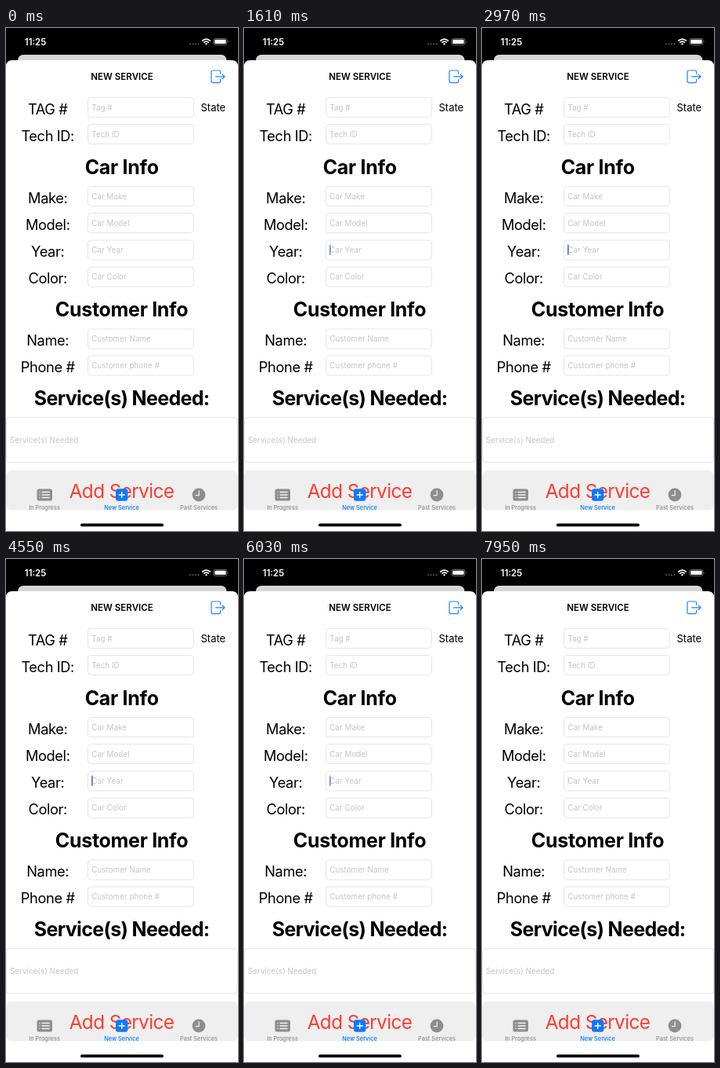
Recreate the animation shown at these times as an HTML page. Size 296 by 640 pixels, loop 8000 ms.

```html
<!DOCTYPE html>
<html lang="en">
<head>
<meta charset="utf-8">
<title>New service form</title>
<style>
  html, body { margin: 0; width: 100%; height: 100%; overflow: hidden; background: #000; }
  svg { display: block; width: 296px; height: 640px; font-family: Inter, Roboto, sans-serif; }
  .mid { text-anchor: middle; }
  .time { font-size: 11.4px; font-weight: 600; fill: #fff; }
  .title { font-size: 11.6px; font-weight: 600; }
  .head { font-size: 25px; font-weight: 700; letter-spacing: -.3px; }
  .head.tight { letter-spacing: -.66px; }
  .label { font-size: 18.3px; letter-spacing: -.4px; }
  .hint { font-size: 9.8px; letter-spacing: .04px; fill: #c4c4c6; }
  .state { font-size: 13px; }
  .add { font-size: 24.3px; letter-spacing: -.6px; fill: #ff3b30; }
  .tab { font-size: 7.35px; font-weight: 500; fill: #8e8e8e; }
  .tab.on { fill: #0a7aff; }
  .box { fill: #fff; stroke: #e5e5e5; stroke-width: 1; }
  .line { fill: none; stroke-linecap: round; stroke-linejoin: round; }

  .caret { fill: #335fd2; animation: blink 8s step-end infinite; }
  .shine { opacity: 0; animation: sweep 8s step-end infinite; }

  @keyframes blink {
    0%, 15.625%, 28.375%, 39.5%, 58.25%, 70.875%, 83.625%, 96.375% { opacity: 0; }
    6.25%, 18.625%, 44.75%, 61.25%, 73.875%, 86.625%, 99.375% { opacity: .08; }
    7.875%, 20.125%, 62.75%, 75.375%, 88.125% { opacity: .65; }
    14.125%, 26.875%, 69.5%, 82.125%, 94.875% { opacity: .55; }
    30.25%, 46.75% { opacity: 1; }
    37.125%, 56.875% { opacity: .85; }
  }
  @keyframes sweep {
    0%, 37.125% { opacity: 0; }
    30.25% { opacity: 1; transform: none; }
    31.5% { opacity: .8; transform: translateX(25px); }
    32.875% { opacity: .6; transform: translateX(50px); }
    34.125% { opacity: .3; transform: translateX(75px); }
  }
</style>
</head>
<body>
<svg viewBox="0 0 296 640">
  <defs>
    <linearGradient id="glow">
      <stop offset="0" stop-color="#7c7c7c"/>
      <stop offset=".35" stop-color="#6a6a6a"/>
      <stop offset=".7" stop-color="#3c3c3c"/>
      <stop offset="1" stop-color="#a0a0a0"/>
    </linearGradient>
    <clipPath id="pill"><rect x="95" y="630.5" width="106" height="3.8" rx="1.9"/></clipPath>
  </defs>
  <rect width="296" height="640"/>

  <!-- status bar -->
  <text class="time mid" x="37.5" y="21.6">11:25</text>
  <g fill="#5c5c5c">
    <circle cx="235" cy="20.3" r="1"/><circle cx="238.5" cy="20.3" r="1"/>
    <circle cx="242" cy="20.3" r="1"/><circle cx="245.5" cy="20.3" r="1"/>
  </g>
  <path d="M250.2 16.5Q255.5 11.7 260.8 16.5M252.2 18.6Q255.5 15.6 258.8 18.6" fill="none" stroke="#fff" stroke-width="1.7"/>
  <path d="M253.8 19.9Q255.5 18.6 257.2 19.9L255.5 21.7Z" fill="#fff"/>
  <rect x="264.9" y="13.4" width="17" height="8" rx="2.4" fill="none" stroke="#8a8a8a" stroke-width=".8"/>
  <rect x="266.2" y="14.7" width="14.4" height="5.4" rx="1.3" fill="#fff"/>
  <path d="M283 16q1.3 1.4 0 2.8z" fill="#8a8a8a"/>

  <!-- stacked sheets -->
  <rect x="15" y="34" width="266.5" height="20" rx="7" fill="#d6d6d6"/>
  <path d="M0 640V49q0-8 8-8H288q8 0 8 8V640Z" fill="#fff"/>
  <text class="title mid" x="148" y="66">NEW SERVICE</text>
  <g class="line" stroke="#1a84ff" stroke-width="1.2">
    <path d="M273.6 58.2V56q0-2-2-2H264q-2 0-2 2V67.6q0 2 2 2H271.6q2 0 2-2V65.4"/>
    <path d="M267.6 61.8H278.8M276 58.9L279 61.8L276 64.7"/>
  </g>

  <!-- form -->
  <g id="form"></g>
  <text class="state" x="248.5" y="106">State</text>
  <text class="head mid" x="147.7" y="186">Car Info</text>
  <text class="head mid" x="147.5" y="367">Customer Info</text>
  <text class="head tight mid" x="147.7" y="480">Service(s) Needed:</text>
  <rect class="box" x=".5" y="495.5" width="295" height="57" rx="3.5"/>
  <text class="hint" x="5" y="527.6">Service(s) Needed</text>
  <rect class="caret" x="109" y="275.6" width="1.7" height="13.2" rx=".6"/>

  <!-- button and tab bar -->
  <rect y="563" width="296" height="50.5" rx="7" fill="#efefef"/>
  <text class="add mid" x="147.5" y="598">Add Service</text>

  <rect x="39.5" y="586.5" width="19.5" height="15" rx="2.6" fill="#8e8e8e"/>
  <path class="line" d="M43 590.5h.1M46.2 590.5h9M43 594h.1M46.2 594h9M43 597.5h.1M46.2 597.5h9" stroke="#f4f4f4" stroke-width="1.3"/>
  <rect x="140" y="586.3" width="15.4" height="15.4" rx="3.2" fill="#0a7aff"/>
  <path class="line" d="M147.7 590.4v7.2M144.1 594h7.2" stroke="#fff" stroke-width="1.4"/>
  <circle cx="246" cy="594" r="8.4" fill="#8e8e8e"/>
  <path class="line" d="M246.2 588.8V594.6H242.2" stroke="#f4f4f4" stroke-width="1.2"/>

  <text class="tab mid" x="49" y="612.5">In Progress</text>
  <text class="tab on mid" x="147.5" y="612.5">New Service</text>
  <text class="tab mid" x="246" y="612.5">Past Services</text>

  <!-- home indicator with a passing shine -->
  <g clip-path="url(#pill)">
    <rect x="95" y="630" width="106" height="5"/>
    <rect class="shine" x="95" y="630" width="106" height="5" fill="url(#glow)"/>
  </g>
</svg>
<script>
  // label, placeholder, vertical centre
  const fields = [
    ['TAG #', 'Tag #', 101],
    ['Tech ID:', 'Tech ID', 135],
    ['Make:', 'Car Make', 214],
    ['Model:', 'Car Model', 248],
    ['Year:', 'Car Year', 282.5],
    ['Color:', 'Car Color', 316.7],
    ['Name:', 'Customer Name', 395.5],
    ['Phone #', 'Customer phone #', 429.5]
  ];
  document.getElementById('form').innerHTML = fields.map(([label, hint, y]) => `
    <text class="label mid" x="53.2" y="${y + 8.6}">${label}</text>
    <rect class="box" x="104.5" y="${y - 12.5}" width="135" height="25" rx="4"/>
    <text class="hint" x="109.3" y="${y + 3.6}">${hint}</text>`).join('');
</script>
</body>
</html>
```
